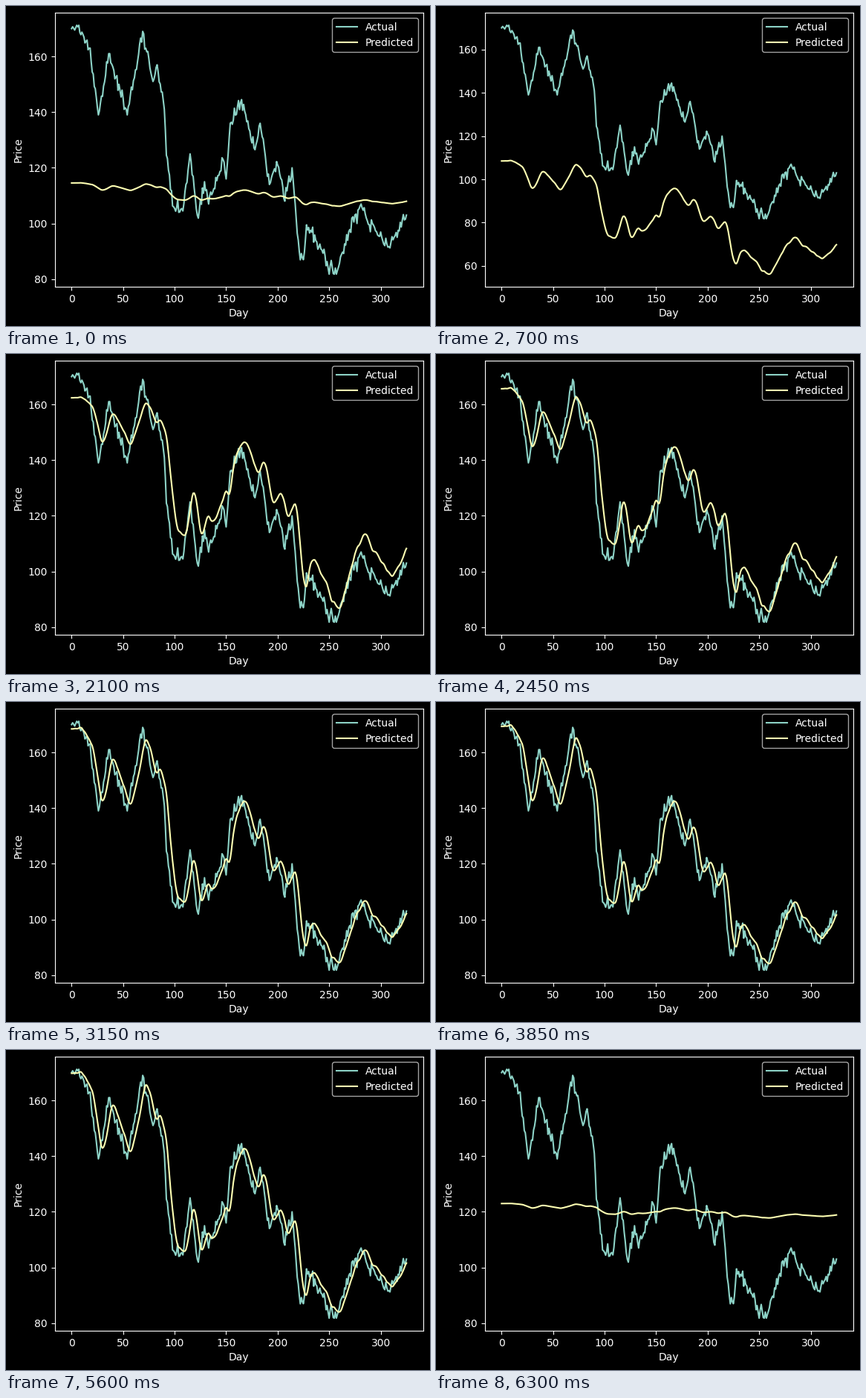
Write a matplotlib script that moves like this. It is 571 px wide and 432 px high and loops after 6650 ms.

```python
import numpy as np
import matplotlib.pyplot as plt
from matplotlib.animation import FuncAnimation

W, H, DPI = 571, 432, 100
FRAMES, INTERVAL = 19, 350
LAST_DAY = 325

# Main turning points of the price: (day, price)
TURNS = [
    (0, 170), (5, 171.2), (18, 163), (26, 139), (36, 161), (54, 139),
    (69, 169), (79, 151), (83, 157), (90, 141), (92, 124.5), (99, 106),
    (108, 104.5), (115, 125), (122, 103), (129, 115), (133, 107), (147, 123),
    (150, 116), (154, 136), (165, 144.5), (178, 126.5), (183, 136),
    (192, 114), (200, 121), (206, 109), (214, 120), (221, 90), (225, 87),
    (228, 99.5), (257, 81.8), (269, 97), (281, 107), (287, 101), (307, 91.5),
    (325, 103),
]

# Lowest and highest prediction in the first epochs, before it settles
EARLY = [(117.8, 123), (106.2, 114.6), (76, 100.5),
         (56.2, 108.7), (86.7, 139), (93, 145.8)]
FINAL = np.array([84, 170.3])


def price_curve(days):
    turn_days, turn_prices = zip(*TURNS)
    jitter = np.random.default_rng(7).normal(0, 1.4, days.size)
    jitter[list(turn_days)] = 0
    price = np.interp(days, turn_days, turn_prices) + jitter
    return np.clip(price, min(turn_prices), max(turn_prices))


def lagged(price, length=20):
    """Smooth with a kernel that trails the price by about four days."""
    k = np.arange(length)
    kernel = k**3 * np.exp(-k)
    padded = np.concatenate([np.full(length - 1, price[0]), price])
    return np.convolve(padded, kernel / kernel.sum(), mode="valid")


def prediction_range(epoch):
    last = len(EARLY) - 1
    if epoch <= last:
        return EARLY[epoch]
    return FINAL + (EARLY[last] - FINAL) * 0.56 ** (epoch - last)


def prediction(n):
    epoch = (n + 1) % FRAMES  # the untrained model closes the loop
    low, high = prediction_range(epoch)
    bow = 0.75 * np.exp(-((epoch - 5.3) / 2.6) ** 2)
    return low + (high - low) * (level + bow * level * (1 - level))


days = np.arange(LAST_DAY + 1)
actual = price_curve(days)
smooth = lagged(actual)
level = (smooth - smooth.min()) / np.ptp(smooth)

plt.style.use("dark_background")
fig = plt.figure(figsize=((W + 0.001) / DPI, (H + 0.001) / DPI), dpi=DPI)
ax = fig.add_axes([65.8 / W, 1 - 378.8 / H, 496 / W, 369.6 / H])
ax.plot(days, actual, label="Actual")
predicted, = ax.plot(days, prediction(0), label="Predicted")
ax.set_xlabel("Day")
ax.set_ylabel("Price")
ax.legend(loc="upper right")


def update(n):
    predicted.set_data(days, prediction(n))
    ax.relim()
    ax.autoscale_view()
    return predicted,


anim = FuncAnimation(fig, update, frames=FRAMES, interval=INTERVAL,
                     repeat=True, repeat_delay=0, blit=False)
plt.show()
```
